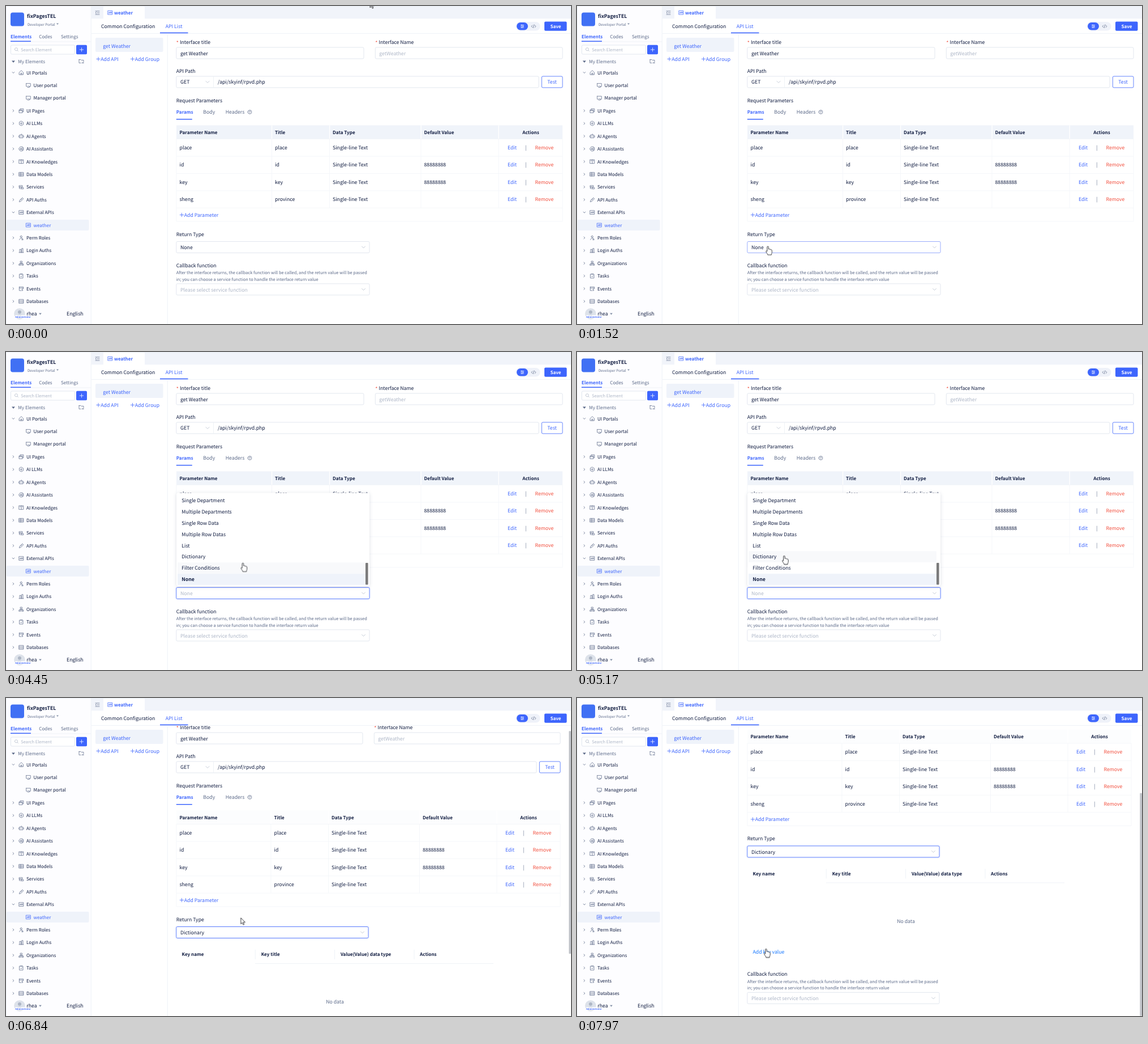
An HTML page that plays this animation: 998 px wide and 561 px high, repeating every 8 s.

```html
<!DOCTYPE html>
<html lang="en">
<head>
<meta charset="utf-8">
<title>API editor</title>
<style>
@property --scroll { syntax: "<length>"; inherits: true; initial-value: 0px; }
html, body { margin: 0; width: 100%; height: 100%; overflow: hidden; background: #fff; }
svg { display: block; width: 100vw; height: 100vh; }
text {
  font: 8.73px "Noto Sans CJK SC", "Noto Sans CJK JP", "Noto Sans CJK", "Noto Sans SC", "Noto Sans", sans-serif;
  fill: #101c40; text-rendering: geometricPrecision; white-space: pre;
}
.m { font-size: 8.11px; }
.s { font-size: 7.485px; }
.xs { font-size: 6.24px; }
.b { font-weight: 700; }
.mid { text-anchor: middle; }
.blue { fill: #3d65fd; }
.link { fill: #1677ff; }
.red { fill: #f2503f; }
.grey { fill: #5c6a89; }
.hint { fill: #adb6c7; }
.white { fill: #fff; }
.i { fill: none; stroke: #5c6a89; stroke-width: .75; stroke-linecap: round; stroke-linejoin: round; }
.i.on { stroke: #3d65fd; }
.i.lite { stroke: #b4bccb; }
.i.inv { stroke: #fff; }
.line { stroke: #e9edf4; stroke-width: .7; }
.cell { stroke: #f1f4f8; stroke-width: .7; }
.box { fill: #fff; stroke: #dbe1eb; stroke-width: .8; }
.focus { stroke: #3d65fd; }
.glow { fill: none; stroke: #3d65fd; stroke-opacity: .07; stroke-width: 2; }

#wide, #narrow, #arrow, #hand, #hover, .field, .glow.late, .value, .thead {
  animation: 8s steps(1, end) infinite;
}
#wide { animation-name: wide; }
#narrow { animation-name: narrow, scroll; }
#arrow { animation-name: arrow; }
#hand { animation-name: hand; }
#hover { animation-name: hover; }
.field { animation-name: field; }
.glow.late { animation-name: late; }
.value { animation-name: value; }
.thead { animation-name: thead; }
#page { transform: translateY(calc(var(--scroll) * -1)); }
#thumb { transform: translateY(calc(var(--scroll) * .768)); }
#menu { transform-origin: 0 413px; animation: menu 8s linear infinite; }
#cursor { animation: cursor 8s linear infinite; }

@keyframes wide { 0% { visibility: visible } 70.25%, 100% { visibility: hidden } }
@keyframes narrow { 0% { visibility: hidden } 70.25%, 100% { visibility: visible } }
@keyframes scroll {
  0% { --scroll: 0px }
  85.5% { --scroll: 12px }
  86% { --scroll: 42px }
  86.5% { --scroll: 78px }
  87% { --scroll: 110px }
  87.5% { --scroll: 135.5px }
  88% { --scroll: 149px }
  88.5%, 100% { --scroll: 154.5px }
}
@keyframes arrow { 0% { opacity: 1 } 13.75% { opacity: 0 } 70.25% { opacity: 1 } 97.5%, 100% { opacity: 0 } }
@keyframes hand { 0% { opacity: 0 } 13.75% { opacity: 1 } 70.25% { opacity: 0 } 97.5%, 100% { opacity: 1 } }
@keyframes field { 0% { stroke: #dbe1eb } 13.75% { stroke: #8098fb } 36.8%, 100% { stroke: #3d65fd } }
@keyframes late { 0% { opacity: 0 } 36.8%, 100% { opacity: 1 } }
@keyframes value { 0% { fill: #101c40 } 37.3%, 100% { fill: #adb6c7 } }
@keyframes thead { 0% { fill: #f0f4fa } 85.5%, 100% { fill: #fcfdfe } }
@keyframes hover {
  0% { opacity: 0; transform: none }
  53.2% { opacity: 1; transform: none }
  58%, 100% { opacity: 1; transform: translateY(-20px) }
}
@keyframes menu {
  0%, 37.2% { opacity: 0; transform: scaleY(.8); animation-timing-function: cubic-bezier(.23, 1, .32, 1) }
  40.4%, 70.25% { opacity: 1; transform: none; animation-timing-function: cubic-bezier(.4, .1, .6, .7) }
  73%, 100% { opacity: 0; transform: scaleY(.8) }
}
@keyframes cursor {
  0%, .5% { transform: translate(643px, -8px) }
  2.5% { transform: translate(665px, 130px) }
  5% { transform: translate(672px, 390px) }
  6.7% { transform: translate(590px, 510px) }
  8.5% { transform: translate(420px, 450px) }
  10.5%, 11% { transform: translate(304px, 346px) }
  14.5% { transform: translate(312px, 428px) }
  16.2% { transform: translate(320px, 443px) }
  19% { transform: translate(337px, 424px) }
  21%, 22% { transform: translate(367px, 435px) }
  26.5%, 49.4% { transform: translate(413.5px, 421.5px) }
  55.6% { transform: translate(418.5px, 372.5px) }
  59.6%, 60% { transform: translate(418px, 363px) }
  64.6%, 80.3% { transform: translate(366px, 359.5px) }
  83%, 94% { transform: translate(414.8px, 387.8px) }
  97.5% { transform: translate(342px, 437px) }
  99.6%, 100% { transform: translate(334px, 442.5px) }
}
</style>
</head>
<body>
<svg id="stage" viewBox="0 0 998 561" preserveAspectRatio="none"></svg>
<script>
// y is the middle of the capitals
const text = (x, y, str, cls = '') => `<text x="${x}" y="${y + 3.1}" class="${cls}">${str}</text>`;
const rect = (x, y, w, h, fill, r = 0, cls = '') =>
  `<rect x="${x}" y="${y}" width="${w}" height="${h}" rx="${r}" class="${cls}" ${fill ? `fill="${fill}"` : ''}/>`;
const box = (x, y, right, cls = '', h = 20) => rect(x, y, right - x, h, '', 2, 'box ' + cls);
const line = (x1, y1, x2, y2, cls = 'line') => `<path class="${cls}" d="M${x1} ${y1}L${x2} ${y2}"/>`;
const icon = (x, y, d, cls = '') => `<path class="i ${cls}" transform="translate(${x} ${y})" d="${d}"/>`;
const tri = (x, y, w, fill = '#8591a8') => `<path fill="${fill}" d="M${x - w} ${y - w / 2}h${2 * w}l${-w} ${w * 1.2}z"/>`;

const blue = '#3d65fd', soft = '#eff3fa';
const down = 'M-3-1.5L0 1.5L3-1.5', plus = 'M-3.2 0H3.2M0-3.2V3.2';
const ring = r => `M${-r} 0a${r} ${r} 0 1 0 ${2 * r} 0a${r} ${r} 0 1 0 ${-2 * r} 0`;
const frame = 'M-3.8-3.3H3.8V3.3H-3.8Z';
const icons = {
  home: 'M-3.5-.5L0-3.8L3.5-.5V3.6H-3.5ZM-1 3.5V1H1V3.5',
  screen: 'M-3.8-3.2H3.8V2H1M-3.8-3.2V2H-1M-1.5 3.6H1.5M0 1L2.5 3',
  pages: 'M-3.6-1.5H2V3.6H-3.6ZM-2-1.5V-3.5H3.8V1.8H2M-3.6 0H2',
  hex: 'M0-4L3.5-2V2L0 4L-3.5 2V-2Z' + ring(1.3),
  agent: 'M-3-2H3V3H-3ZM0-2V-4M-4.2-.5V1.5M4.2-.5V1.5M-1.3 0V1M1.3 0V1',
  assist: ring(4) + 'M-2 2L-.5-2L1 2M-1.5 .8H.4M2.2-2V2',
  book: frame + 'M0-3.3V3.3M-2.5-1.5H-1.3M1.3-1.5H2.5',
  table: frame + 'M-3.8-1H3.8M-3.8 1.2H3.8M-1-3.3V3.3',
  service: 'M-3.5-2.5H2V0H-3.5ZM-3.5 0H0M-3.5 0V2.8H0M.5 1H3.8V3.4H.5Z',
  pen: 'M-3.5 3.5L-2.5 .5L2-3.5L3.8-1.8L-.5 2.7ZM-1 .5L1-1.2',
  api: frame + 'M-2.5 1L-1.7-1L-1 1M.2 1V-1H1.2V.2H.2M2.4-1V1',
  user: 'M-1.8-2a1.6 1.6 0 1 0 3.2 0a1.6 1.6 0 1 0-3.2 0M-3.2 3.4C-3.2 0 2.4 0 2.4 1M.5 3H3.6M2 1.6V4',
  login: 'M-3 3.5V-2H-.5V3.5M.8 3.5V-3.6H3V3.5M-4 3.5H4',
  org: 'M-1.4-3.6H1.4V-.8H-1.4ZM-3.8 1.4H-1.2V3.6H-3.8ZM1.2 1.4H3.8V3.6H1.2ZM0-.8V.4M-2.5 1.4V.4H2.5V1.4',
  task: 'M-3-3.2H3V3.8H-3ZM-1-4V-2.6M1-4V-2.6M-1.5 .5L-.3 1.7L1.7-.6',
  event: 'M-3.6-3H3.6V0M-3.6-3V3.4H0M-3.6-1H3.6M2.2 0L.8 2.2H3L1.7 4',
  base: 'M-3.8-3.4H3.8V3.4H-3.8ZM-3.8-1.1H3.8M-3.8 1.2H3.8'
};

const tree = `UI Portals:home:open|User portal:screen:sub|Manager portal:screen:sub|UI Pages:pages|AI LLMs:hex
AI Agents:agent|AI Assistants:assist|AI Knowledges:book|Data Models:table|Services:service|API Auths:pen
External APIs:api:open|weather:api:pick|Perm Roles:user|Login Auths:login|Organizations:org|Tasks:task
Events:event|Databases:base`.split(/[|\n]/).map(row => row.split(':'));

function treeRow([name, key, kind], n) {
  const y = 117.5 + n * 22.42;
  if (kind === 'sub' || kind === 'pick') {
    const on = kind === 'pick';
    return (on ? rect(1, y - 9.6, 145.5, 19, soft, 2) : '') +
      icon(39.5, y, icons[key], on ? 'on' : '') + text(48.5, y, name, on ? 'm blue' : 'm');
  }
  const arrow = kind ? 'M-1.8-1L0 1L1.8-1' : 'M-1-1.8L1 0L-1 1.8';
  return icon(13, y, arrow) + icon(27, y, icons[key]) + text(36, y, name, 'm');
}

const sidebar = () => rect(0, 0, 150, 561, '#fdfdff') + line(150.3, 0, 150.3, 561) +
  rect(8, 11.5, 24, 24, '#4070f4', 4) +
  text(37, 17.5, 'fixPagesTEL', 'b') +
  text(38, 31.7, 'Developer Portal', 'xs grey') + tri(91, 31.5, 2) +
  line(8, 63, 150, 63) + rect(8, 61.5, 36, 1.5, blue) +
  text(8, 54, 'Elements', 'm b blue') + text(58.3, 54, 'Codes', 'm grey') + text(97, 54, 'Settings', 'm grey') +
  box(8.5, 69, 121.5, '', 16) + icon(18, 76.3, ring(2.6) + 'M2 2L3.6 3.6', 'lite') +
  text(26.3, 77, 'Search Element', 's hint') +
  rect(124, 68.7, 19, 16.5, blue, 2) + icon(133.5, 77, plus, 'inv') +
  tri(13, 98, 3, '#5c6a89') + text(21.3, 97.7, 'My Elements', 'm grey') +
  icon(133, 97.5, 'M-4-3H-1L0-2H4V1M-4-3V3H-1M1 3H4M2.5 1.5L4 3') +
  tree.map(treeRow).join('') +
  '<circle cx="24" cy="543" r="9.8" fill="#dde2ea"/><circle cx="24" cy="540" r="3" fill="#aeb7c6"/>' +
  '<path fill="#aeb7c6" d="M17.5 549.5C18 543 30 543 30.5 549.5z"/>' +
  rect(16, 545.6, 27.5, 4.8, '#fff', 1) +
  '<text x="16.3" y="549.6" class="blue b" style="font-size:4px">Administrator</text>' +
  text(36.3, 543, 'rhea') + tri(60.5, 543, 2.4) + text(107, 543, 'English');

const header = () => rect(151, 0, 847, 22.3, '#f1f4fa') + rect(172, 1, 73, 22, '#fff', 1) +
  icon(161.5, 12, 'M-3.5-3H3.5M-.5 0H3.5M-3.5 3H3.5M-2-1.5L-3.5 0L-2 1.5') +
  icon(184, 11.7, icons.api, 'on') + text(191, 11.7, 'weather', 'm b blue') +
  line(151, 48.4, 998, 48.4) +
  text(168, 36, 'Common Configuration') + text(281.8, 36, 'API List', 'blue') + rect(272, 46.6, 49.5, 1.6, blue) +
  rect(901, 28, 42.5, 15.5, '#eff2f9', 7.7) + rect(902, 29, 20, 13.5, blue, 6.7) +
  icon(912, 35.8, 'M-2.6-2.2H2.6M-2.6 0H2.6M-2.6 2.2H2.6M-1-2.8V-1.6M1.2-.6V.6M-.6 1.6V2.8', 'inv') +
  icon(932, 35.8, 'M-2-2L-4 0L-2 2M2-2L4 0L2 2M.8-2.8L-.8 2.8') +
  rect(951, 27.5, 39.5, 16.3, blue, 2) + text(971, 36, 'Save', 'm b white mid');

const list = () => rect(158, 56, 119.5, 25, soft, 2) + text(171.3, 70.5, 'get Weather', 'blue') +
  icon(163, 93.5, plus, 'on') + text(167.3, 93.5, 'Add API', 'blue') +
  icon(223.5, 93.5, plus, 'on') + text(227.8, 93.5, 'Add Group', 'blue') + line(285.3, 48.5, 285.3, 561);

const label = (x, str) => text(x, 65, '*', 'red') + text(x + 6.2, 64, str);

function params(cols, right, shift) {
  const heads = ['Parameter Name', 'Title', 'Data Type', 'Default Value'];
  const rows = [['place', 'place', ''], ['id', 'id', '88888888'], ['key', 'key', '88888888'], ['sheng', 'province', '']];
  let out = rect(301, 210.5, right - 301, 24, '#f0f4fa', 0, shift ? 'thead' : '');
  heads.forEach((h, n) => out += text(cols[n] + 5.5, 222.4, h, 'm b'));
  out += text(927 - shift, 222.4, 'Actions', 'm b mid');
  rows.forEach(([name, title, preset], n) => {
    const y = 249.8 + n * 30.4;
    [name, title, 'Single-line Text', preset].forEach((v, c) => out += text(cols[c] + 5.5, y, v));
    out += text(886 - shift, y, 'Edit', 'blue') + text(917 - shift, y, '|', 'grey') +
      text(934.5 - shift, y, 'Remove', 'red') + line(301, y + 15.3, right, y + 15.3, 'cell');
  });
  cols.slice(1).forEach(x => out += rect(x - .6, 210.5, 1.3, 24, '#fff') + line(x, 234.5, x, 356, 'cell'));
  out += [301, right].map(x => line(x, 234.5, x, 380, 'cell')).join('');
  out += [234.5, 380].map(y => line(301, y, right, y, 'cell')).join('');
  return out + icon(310.5, 368.5, plus, 'on') + text(314.8, 368.5, 'Add Parameter', 'blue');
}

const callback = (y, right) => text(300.8, y, 'Callback function') +
  text(300.8, y + 12.8, 'After the interface returns, the callback function will be called, and the return value will be passed', 's grey') +
  text(300.8, y + 24.3, 'in; you can choose a service function to handle the interface return value', 's grey') +
  box(300.8, y + 32.4, right) + text(308, y + 42.9, 'Please select service function', 'hint') +
  icon(right - 10.5, y + 42.5, down, 'lite');

const keyTable = () => {
  const heads = ['Key name', 'Key title', 'Value(Value) data type', 'Actions'];
  return heads.map((h, n) => text(310.5 + n * 140.2, 464.3, h, 'm b') +
    (n ? line(300 + n * 140.3, 456, 300 + n * 140.3, 473) : '')).join('') +
    line(440, 480.5, 861, 480.5) + text(581, 548.3, 'No data', 'grey mid') + text(310.5, 602.4, 'Add key value', 'link');
};

// the narrow form makes room for the scrollbar
function form(narrow) {
  const shift = narrow ? 4 : 0, half = shift / 2, right = 983 - shift, pick = 642 - half;
  const cols = narrow ? [301, 468, 569.5, 730.5, 867] : [301, 469.5, 571.5, 733, 870];
  const glow = rect(299.8, 414.5, pick - 298.8, 22, '', 3, narrow ? 'glow' : 'glow late');
  return label(300.8, 'Interface title') + label(652.3 - half, 'Interface Name') +
    box(300.8, 73, 632 - half) + text(308, 83.5, 'get Weather') +
    box(652.3 - half, 73, right) + text(659.3 - half, 83.5, 'getWeather', 'hint') +
    text(300.8, 115, 'API Path') + box(300.8, 124, 941 - shift) + line(366.5, 124, 366.5, 144) +
    text(308, 134.2, 'GET') + icon(356, 134, down, 'lite') + text(374, 134.2, '/api/skyinf/rpvd.php') +
    box(946.3 - shift, 124, right, 'focus') + text(964.6 - shift, 134.2, 'Test', 'blue mid') +
    text(300.8, 166.7, 'Request Parameters') +
    text(300.8, 186.7, 'Params', 'm b blue') + text(348.3, 186.7, 'Body', 'grey') + text(387.7, 186.7, 'Headers', 'grey') +
    icon(430.5, 187, ring(3.4) + 'M-1.1-.8C-1.1-2.4 1.2-2.2 1.1-.8C1 0 0-.1 0 .8M0 1.9V2') +
    rect(300.8, 199, 28, 1.5, blue) + params(cols, right, shift) +
    text(300.8, 402.8, 'Return Type') + glow + box(300.8, 415.5, pick, narrow ? 'focus' : 'field') +
    text(308, 426, narrow ? 'Dictionary' : 'None', narrow ? '' : 'value') + icon(pick - 10.5, 425.5, down, 'lite') +
    (narrow ? keyTable() + callback(641.5, pick) : callback(457.5, pick));
}

const menu = () => {
  const items = ['Single Department', 'Multiple Departments', 'Single Row Data', 'Multiple Row Datas',
    'List', 'Dictionary', 'Filter Conditions', 'None'];
  return '<rect x="301" y="248.5" width="341" height="164.5" rx="3" fill="#fff" style="filter:drop-shadow(0 1px 3px #1a2a5026)"/>' +
    `<g id="hover">${rect(303, 371.3, 332, 19.8, '#f8f9fb')}</g>` + rect(303, 391.2, 332, 19.8, soft) +
    items.map((s, n) => text(310.3, 261.6 + n * 19.95, s, s === 'None' ? 'b' : '')).join('') +
    rect(635, 372, 4.6, 38.5, '#7c7c7c', 1);
};

const arrow = 'M0 0V10.8L2.5 8.5L4.2 12.3L5.9 11.5L4.2 7.8H7.6Z';
const hand = 'M-1.3 1C-1.3-.4 1.2-.4 1.2 1V5C1.6 4.2 3.2 4.4 3.3 5.4C3.9 4.8 5.2 5 5.3 6.1C6 5.6 7.2 6 7.2 7.2V10.5' +
  'C7.2 12 6.2 12.8 6.2 15H-.2C-.4 13.2-2 12-3.2 9.6C-4 8.2-2.6 7.4-1.3 8.8Z';

document.getElementById('stage').innerHTML =
  '<clipPath id="view"><path d="M286 48.8H998V561H286Z"/></clipPath>' +
  rect(0, 0, 998, 561, '#fff') +
  `<g clip-path="url(#view)"><g id="wide">${form(false)}</g>` +
  `<g id="narrow"><g id="page">${form(true)}</g><g id="thumb">${rect(994.3, 49, 3.7, 393, '#c1c4c9', 1)}</g></g></g>` +
  sidebar() + header() + list() +
  `<path class="line" d="M0 .3H998M.3 0V561" fill="none"/><g id="menu">${menu()}</g>` +
  '<g id="cursor" fill="#fff" stroke="#16181d" stroke-width=".85" stroke-linejoin="round">' +
  `<path id="arrow" d="${arrow}"/><path id="hand" d="${hand}"/></g>`;
</script>
</body>
</html>
```
